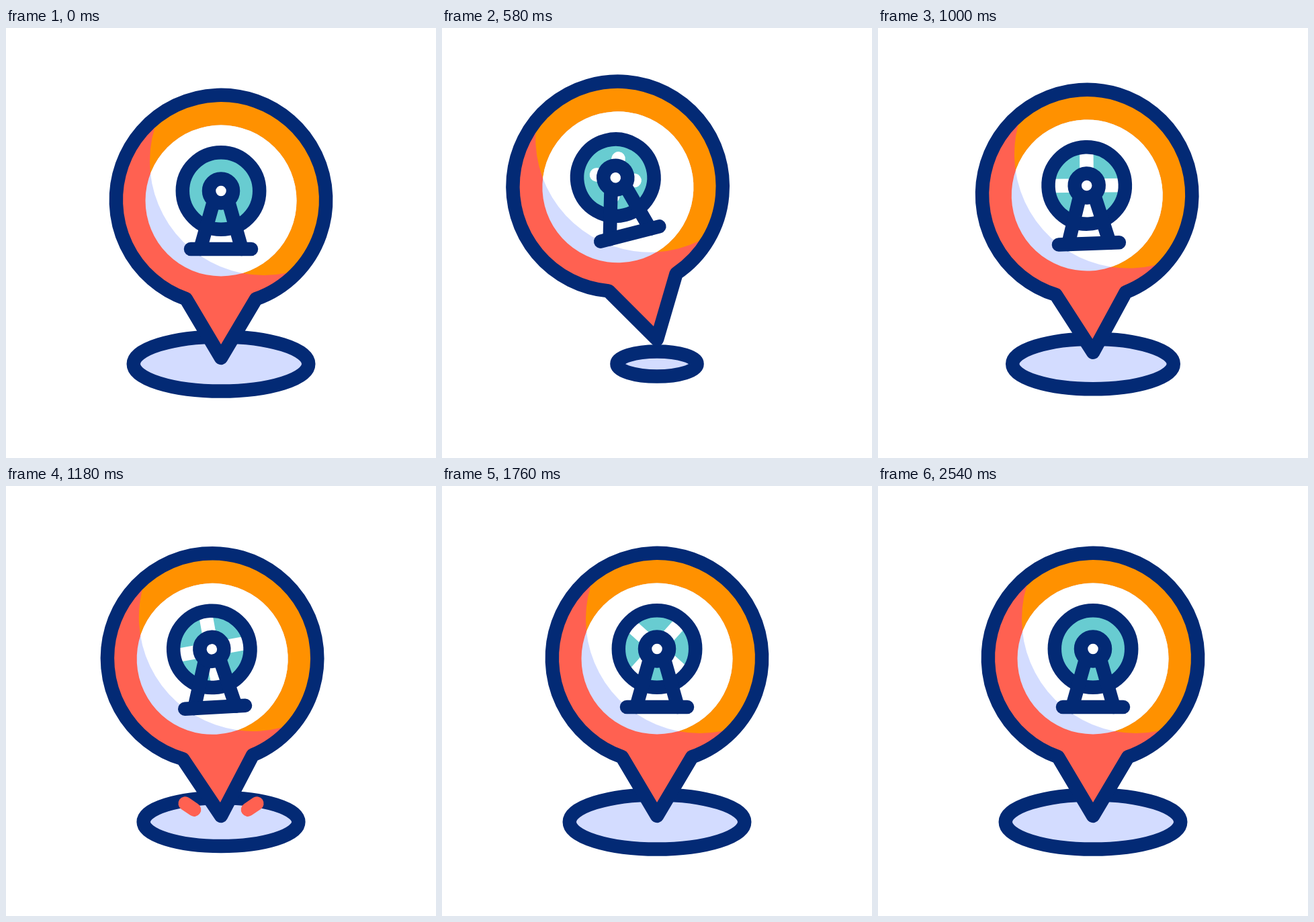
These frames come from a looping animation (640 by 640 pixels, 3.6 s). An HTML page with a canvas:

```html
<!DOCTYPE html>
<html lang="en">
<head>
<meta charset="utf-8">
<title>Ferris wheel pin</title>
<style>
html, body { margin: 0; height: 100%; overflow: hidden; background: #fff; }
canvas { display: block; }
</style>
</head>
<body>
<canvas id="stage" width="640" height="640"></canvas>
<script>
const ctx = document.getElementById('stage').getContext('2d');
const LOOP = 3600, STROKE = 20.5, TIP = 491;
const NAVY = '#032a75', RED = '#ff6151', ORANGE = '#ff9100';
const TEAL = '#68ccd1', LILAC = '#d3dcff', WHITE = '#fff';

// Keys are [time, value] pairs.
const TILT = [[0, 0], [840, -18.6], [1085, 4], [1190, -3.3], [1290, 0]];
const DROP = [[840, 38], [1070, 0]];
const SHADOW = [[80, 1], [800, 0.303], [840, 0.303], [1085, 1.15], [1190, 0.88], [1290, 1]];
const SPOKE = [[320, 0], [840, 57], [1860, 57], [2440, 0]];
const SPIN = [[0, 48], [580, 23], [820, 10.5], [1180, -7], [1760, -48], [2540, -95]];
const HEAD = [[1060, 0], [1300, 58]];
const TAIL = [[1110, 0], [1340, 58]];

const linear = u => u;
const smooth = u => u * u * (3 - 2 * u);
const rad = deg => deg * Math.PI / 180;

function at(keys, t, ease = smooth) {
  const i = keys.findIndex(k => k[0] > t);
  if (i < 0) return keys[keys.length - 1][1];
  if (i === 0) return keys[0][1];
  const [t0, a] = keys[i - 1], [t1, b] = keys[i];
  return a + (b - a) * ease((t - t0) / (t1 - t0));
}

// Slow lift-off, quick rise, soft stop, then the fall.
function lift(t) {
  if (t < 560) return 24 * (t / 560) ** 3.56;
  if (t < 820) return 38 - 14 * (1 - (t - 560) / 260) ** 3.5;
  return at(DROP, t);
}

function paint(fill, stroke) {
  if (fill) { ctx.fillStyle = fill; ctx.fill(); }
  if (stroke) { ctx.strokeStyle = stroke; ctx.stroke(); }
}

function oval(x, y, rx, ry, fill, stroke) {
  ctx.beginPath();
  ctx.ellipse(x, y, rx, ry, 0, 0, 2 * Math.PI);
  paint(fill, stroke);
}

const circle = (x, y, r, fill, stroke) => oval(x, y, r, r, fill, stroke);

function line(x0, y0, x1, y1, color) {
  ctx.beginPath();
  ctx.moveTo(x0, y0);
  ctx.lineTo(x1, y1);
  paint(null, color);
}

// Fills the current path in two tones split by a large circle.
function shaded(dark, light) {
  ctx.save();
  paint(dark);
  ctx.clip();
  circle(384, 198, 170, light);
  ctx.restore();
}

function pinPath() {
  const half = Math.atan2(52, 147);
  ctx.beginPath();
  ctx.arc(320, 256, 156.2, Math.PI / 2 + half, Math.PI / 2 - half);
  ctx.lineTo(320, TIP);
  ctx.closePath();
}

function drawSparks(t) {
  const head = at(HEAD, t), tail = at(TAIL, t);
  if (head - tail < 0.5) return;
  for (const side of [-1, 1]) {
    const x = d => 320 + side * (29 + d * 0.83), y = d => 489 - d * 0.56;
    line(x(tail), y(tail), x(head), y(head), RED);
  }
}

function drawWheel(t) {
  const x = 320, y = 242.5, length = at(SPOKE, t);
  circle(x, y, 57.2, TEAL);
  if (length > 0) {
    ctx.save();
    ctx.translate(x, y);
    ctx.rotate(rad(at(SPIN, t, linear)));
    line(-length, 0, length, 0, WHITE);
    line(0, -length, 0, length, WHITE);
    ctx.restore();
  }
  circle(x, y, 57.2, null, NAVY);
  line(308.5, 260, 289, 329, NAVY);
  line(331.5, 260, 351, 329, NAVY);
  line(275, 329, 365, 329, NAVY);
  circle(x, y, 18, WHITE, NAVY);
}

function drawPin(t) {
  ctx.save();
  ctx.translate(320, TIP - lift(t));
  ctx.rotate(rad(at(TILT, t)));
  ctx.translate(-320, -TIP);
  pinPath();
  shaded(RED, ORANGE);
  circle(320, 257, 112.5);
  shaded(LILAC, WHITE);
  pinPath();
  paint(null, NAVY);
  drawWheel(t);
  ctx.restore();
}

function draw(t) {
  ctx.fillStyle = WHITE;
  ctx.fillRect(0, 0, 640, 640);
  ctx.lineWidth = STROKE;
  ctx.lineCap = ctx.lineJoin = 'round';
  const size = at(SHADOW, t);
  oval(320, 500, 130.25 * size, 40.6 * size, LILAC, NAVY);
  drawSparks(t);
  drawPin(t);
}

const start = performance.now();
function tick() {
  draw((performance.now() - start) % LOOP);
  requestAnimationFrame(tick);
}
tick();
</script>
</body>
</html>
```
